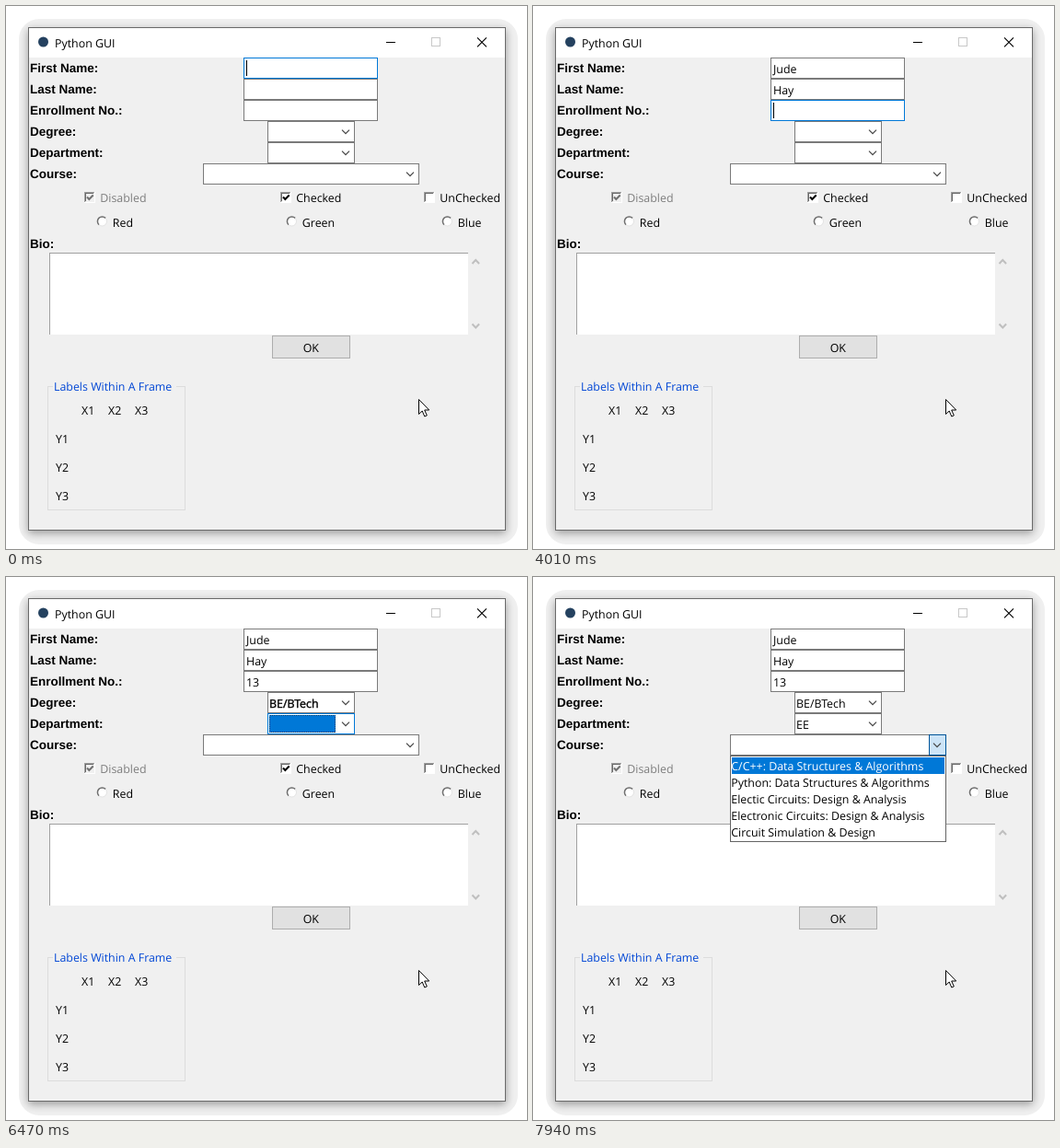
These frames come from a looping animation (566x590 px, 8 s). An HTML page:

```html
<!DOCTYPE html>
<html lang="en">
<head>
<meta charset="utf-8">
<title>Python GUI</title>
<style>
  html, body { margin: 0; width: 100%; height: 100%; overflow: hidden; background: #fff; }
  .panel { position: absolute; left: 14px; top: 14px; width: 542px; height: 571px;
    border-radius: 22px; background: #f0f0f0; overflow: hidden; }
  .shade { position: absolute; left: 10px; top: 9px; width: 519px; height: 547px;
    box-shadow: 0 3px 9px rgba(0, 0, 0, .36); }
  svg { position: absolute; left: 0; top: 0; display: block; }
  rect { shape-rendering: crispEdges; }
  text { font: 12.4px "Open Sans", "Noto Sans", sans-serif; text-rendering: geometricPrecision; }
  text.label { font: bold 13.5px "Liberation Sans", Arial, sans-serif; }
</style>
</head>
<body>
<div class="panel"><div class="shade"></div></div>
<svg id="stage" width="566" height="590" viewBox="0 0 566 590"></svg>
<script>
const NS = 'http://www.w3.org/2000/svg';
const LOOP = 8000;
const BLUE = '#0078d7', GRAY = '#7a7a7a', FACE = '#f0f0f0';
const stage = document.getElementById('stage');

function add(parent, tag, attrs) {
  const el = document.createElementNS(NS, tag);
  for (const k in attrs) el.setAttribute(k, attrs[k]);
  return parent.appendChild(el);
}
const group = () => add(stage, 'g', {});
const fillRect = (p, x, y, width, height, fill) => add(p, 'rect', { x, y, width, height, fill });
function box(p, x, y, w, h, fill, edge) {
  fillRect(p, x, y, w, h, edge);
  fillRect(p, x + 1, y + 1, w - 2, h - 2, fill);
}
function write(p, x, y, str, fill = '#000', more = {}) {
  const el = add(p, 'text', { x, y, fill, ...more });
  el.textContent = str;
  return el;
}
const line = (p, d, stroke, width = 1.2) =>
  add(p, 'path', { d, stroke, fill: 'none', 'stroke-width': width });

// Fixed parts of the window
const base = group();
box(base, 24, 23, 519, 547, FACE, '#6a6a6a');
fillRect(base, 25, 24, 517, 32, '#fff');
add(base, 'circle', { cx: 40.5, cy: 39, r: 5.5, fill: '#24415f' });
write(base, 53, 45, 'Python GUI');
fillRect(base, 413, 39, 10, 1, '#000');
box(base, 462, 34, 10, 10, '#fff', '#c8c8c8');
line(base, 'M512 34.3l10 10M522 34.3l-10 10', '#000', 1.1);

['First Name:', 'Last Name:', 'Enrollment No.:', 'Degree:', 'Department:', 'Course:']
  .forEach((s, i) => write(base, 26, 72 + 23 * i, s, '#000', { class: 'label' }));
write(base, 26, 263, 'Bio:', '#000', { class: 'label' });

function checkbox(x, label, mark, off) {
  const y = 202;
  fillRect(base, x, y, 12, 12, '#fff');
  fillRect(base, x, y, 11, 11, '#a0a0a0');
  fillRect(base, x + 1, y + 1, 10, 10, '#e3e3e3');
  fillRect(base, x + 1, y + 1, 9, 9, '#696969');
  fillRect(base, x + 2, y + 2, 9, 9, off ? FACE : '#fff');
  if (mark) line(base, `M${x + 3} ${y + 5.5}l2.3 2.5 4.4-4.5`, off ? '#707070' : '#000', 2);
  write(base, x + 17.3, 213, label, off ? '#7d7d7d' : '#000');
}
checkbox(85, 'Disabled', true, true);
checkbox(298, 'Checked', true);
checkbox(454, 'UnChecked', false);

function radio(cx, label) {
  const cy = 234;
  add(base, 'circle', { cx, cy, r: 5, fill: '#fff', stroke: '#e3e3e3' });
  line(base, `M${cx - 3.6} ${cy + 3.6}A5 5 0 0 1 ${cx + 3.6} ${cy - 3.6}`, '#707070', 1.5);
  write(base, cx + 11.3, 240, label);
}
radio(104.5, 'Red');
radio(310.5, 'Green');
radio(479.5, 'Blue');

fillRect(base, 47, 268, 455, 89, '#fff');
fillRect(base, 47, 268, 455, 1, '#a0a0a0');
fillRect(base, 47, 268, 1, 89, '#a0a0a0');
line(base, 'M506.5 280l3.8-4 3.8 4M506.5 345.5l3.8 4 3.8-4', '#bfbfbf', 2);

box(base, 289, 358, 85, 25, '#e1e1e1', '#adadad');
write(base, 331.3, 376, 'OK', '#000', { 'text-anchor': 'middle' });

box(base, 45, 413, 150, 135, FACE, '#dcdcdc');
fillRect(base, 51, 413, 134, 1, FACE);
write(base, 52, 418, 'Labels Within A Frame', '#0046d5');
for (let i = 0; i < 3; i++) {
  write(base, 82 + 29 * i, 444, 'X' + (i + 1));
  write(base, 54 + 0, 475 + 31 * i, 'Y' + (i + 1));
}

// Changing parts, then the pointer on top
const live = group();
add(group(), 'path', {
  d: 'M448.5 427.5v16l3.7-3.5 2.6 6 2.5-1.1-2.6-5.9h5z',
  fill: '#fff', stroke: '#000', 'stroke-width': 1
});

const combos = [
  { x: 284, w: 95, items: ['BE/BTech', 'ME/MTech', 'BSc', 'MSc'] },
  { x: 284, w: 95, items: ['EE', 'ECE', 'CSE', 'Other'] },
  { x: 214, w: 235, items: ['C/C++: Data Structures & Algorithms',
    'Python: Data Structures & Algorithms', 'Electic Circuits: Design & Analysis',
    'Electronic Circuits: Design & Analysis', 'Circuit Simulation & Design'] }
];

// Each step changes part of the state; numbered keys are field values
const steps = [
  [0, { 0: '', 1: '', 2: '', 3: '', 4: '', 5: '', focus: 0, caret: 1, open: -1, press: -1, heavy: -1 }],
  [490, { caret: 0 }],
  [800, { caret: 1 }],
  [1350, { 0: 'J' }],
  [1390, { caret: 0 }],
  [1660, { 0: 'Ju', caret: 1 }],
  [1970, { 0: 'Jud' }],
  [2160, { 0: 'Jude' }],
  [2280, { caret: 0 }],
  [2460, { focus: 1, caret: 1 }],
  [3050, { caret: 0 }],
  [3110, { 1: 'H' }],
  [3290, { 1: 'Ha' }],
  [3350, { caret: 1 }],
  [3400, { 1: 'Hay' }],
  [3960, { caret: 0 }],
  [4010, { focus: 2, caret: 1 }],
  [4630, { caret: 0 }],
  [4710, { 2: '1' }],
  [4800, { 2: '13' }],
  [4870, { caret: 1 }],
  [5050, { focus: 3, caret: 0 }],
  [5730, { open: 3, press: 3 }],
  [6040, { open: -1, press: -1, 3: 'BE/BTech' }],
  [6470, { focus: 4, heavy: 3 }],
  [6770, { open: 4, press: 4 }],
  [7140, { press: -1, 4: 'EE', heavy: -1 }],
  [7200, { open: -1 }],
  [7500, { focus: 5, heavy: 4 }],
  [7560, { heavy: -1 }],
  [7940, { open: 5, press: 5 }]
];

function drawEntry(i, s) {
  const y = 56 + 23 * i, on = s.focus === i;
  box(live, 258, y, 146, 23, '#fff', on ? BLUE : GRAY);
  const t = write(live, 261, y + 17, s[i]);
  if (on && s.caret) {
    const end = s[i] ? t.getComputedTextLength() : 0;
    fillRect(live, Math.round(261 + end), y + 3, 1, 17, '#000');
  }
}

function drawCombo(i, s) {
  const { x, w } = combos[i - 3], y = 56 + 23 * i;
  const pressed = s.press === i, on = s.focus === i && !pressed;
  box(live, x, y, w, 23, '#fff', on ? BLUE : GRAY);
  if (pressed) box(live, x + w - 19, y, 19, 23, '#cce4f7', '#005499');
  if (on) {
    fillRect(live, x + 2, y + 2, w - 23, 19, BLUE);
    add(live, 'rect', { x: x + 2.5, y: y + 2.5, width: w - 24, height: 18, fill: 'none',
      stroke: 'rgba(0,0,0,.5)', 'stroke-dasharray': '1 1' });
  }
  line(live, `M${x + w - 14} ${y + 9.7}l4 4 4-4`, '#444');
  const bold = s.heavy === i ? { stroke: '#000', 'stroke-width': .4 } : {};
  write(live, x + 2, y + 17, s[i], on ? '#fff' : '#000', bold);
}

function drawList(i) {
  const { x, w, items } = combos[i - 3], y = 79 + 23 * i;
  box(live, x, y, w, items.length * 18 + 4, '#fff', '#646464');
  fillRect(live, x + 2, y + 2, w - 4, 18, BLUE);
  items.forEach((s, k) => write(live, x + 1.3, y + 16 + 18 * k, s, k ? '#000' : '#fff'));
}

let shown = -1;
function draw(t) {
  const n = steps.filter(([at]) => at <= t).length;
  if (n === shown) return;
  shown = n;
  const s = Object.assign({}, ...steps.slice(0, n).map(([, change]) => change));
  live.replaceChildren();
  for (let i = 0; i < 6; i++) (i < 3 ? drawEntry : drawCombo)(i, s);
  if (s.open >= 0) drawList(s.open);
}

const start = performance.now();
function tick() {
  draw((performance.now() - start) % LOOP);
  requestAnimationFrame(tick);
}
tick();
</script>
</body>
</html>
```
